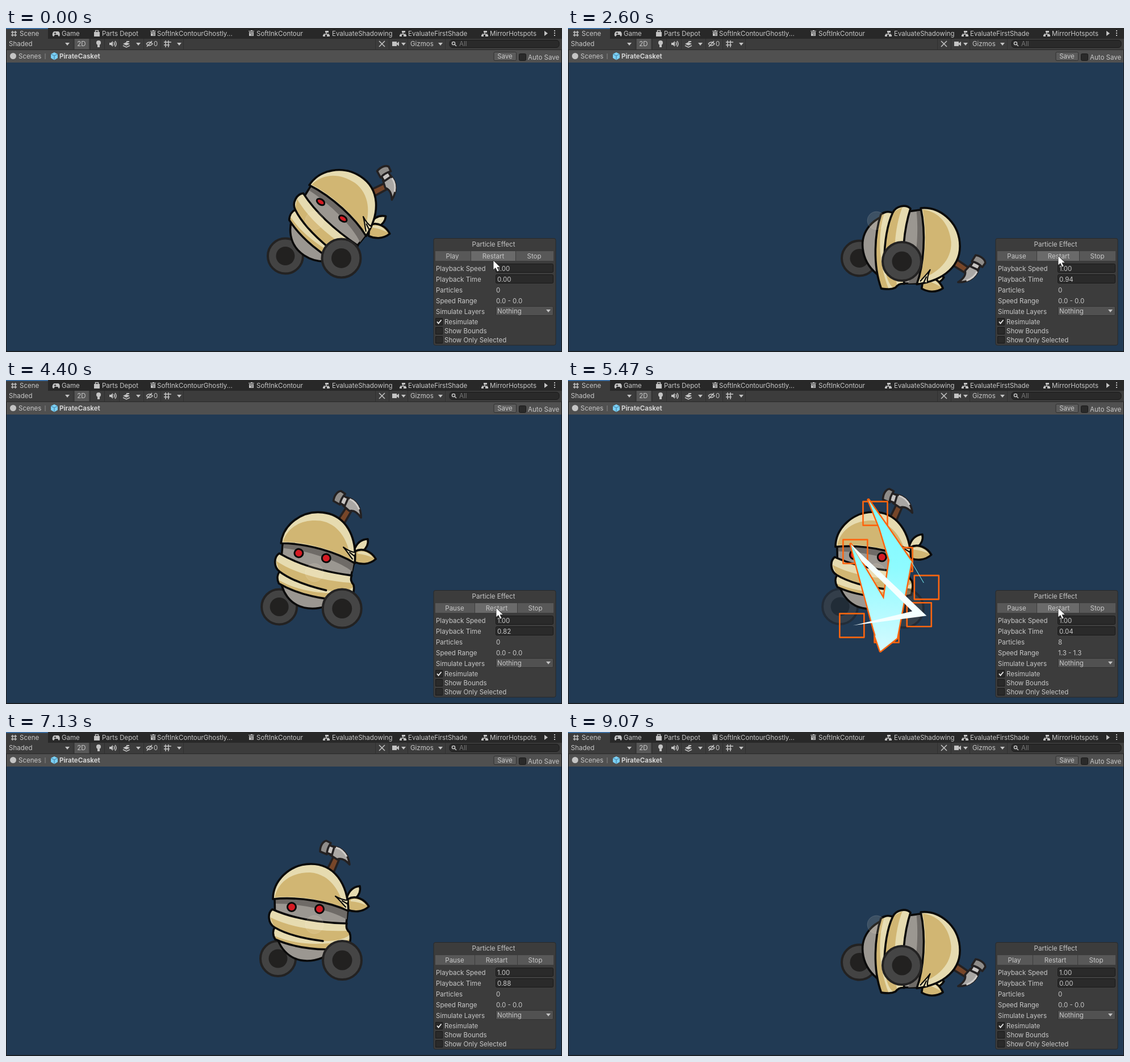
Animation of 979x572 px, one loop 9.27 s. Source, as an HTML page:

```html
<!DOCTYPE html>
<html lang="en">
<head>
<meta charset="utf-8">
<title>Particle preview</title>
<style>
html, body { margin: 0; width: 100%; height: 100%; overflow: hidden; background: #191919; }
svg { display: block; width: 979px; height: 572px; }
text { font: 11.5px Inter, "Open Sans", sans-serif; fill: #c8c8c8; white-space: pre; }
.mid { text-anchor: middle; }
.bold { font-weight: 700; fill: #d2d2d2; }
.ink { stroke: #0a0a0a; stroke-width: 3.6; stroke-linejoin: round; stroke-linecap: round; }
.icon { fill: none; stroke: #c4c4c4; stroke-width: 1.5; }
.solid { fill: #c4c4c4; }
.field { fill: #2a2a2a; stroke: #191919; }
.button { fill: #585858; }
.cream { fill: #e6dbb0; }
.tan { fill: #d1b673; }
</style>
</head>
<body>
<svg viewBox="0 0 979 572">
  <defs>
    <g id="tree" class="icon"><path d="M0-3.5V1M-4 4V1H4V4"/><path class="solid" stroke="none" d="M-2-5H4V-2H-2ZM-6 2H-2V5H-6ZM1 2H6V5H1Z"/></g>
    <g id="shader"><path class="solid" d="M-4-2H4V5H-4ZM-5-4H-1V-5H2V-4H5V-3H-5Z"/><path d="M-3 0H3M-1 3H3" stroke="#282828"/></g>
    <path id="down" class="solid" d="M-4-2H4L0 3Z"/>
    <linearGradient id="beam" x2="0" y2="1"><stop stop-color="#7dfaff"/><stop offset=".45" stop-color="#8efbff"/><stop offset="1" stop-color="#d5faff"/></linearGradient>
  </defs>

  <rect width="979" height="572" fill="#191919"/>
  <rect x="1" y="61" width="977" height="509.5" fill="#213a54"/>

  <g id="tabs">
    <rect width="979" height="19" fill="#282828"/>
    <path d="M0 0H74V19H0Z" fill="#3c3c3c"/><path d="M0 0H74V1.6H0Z" fill="#3a79bb"/>
    <path class="icon" d="M11.5 5V15M16.5 5V15M9 7.5H19M9 12.5H19"/>
    <path class="solid" d="M85 6H92C95 6 96 15 93 15L91 12H86L84 15C80 15 82 6 85 6Z"/>
    <path d="M84.500 9.500H88.500M86.500 7.500V11.500" stroke="#282828"/>
    <path class="solid" d="M155 7H165V15H155Z"/><path class="icon" d="M157.500 7V4.500H162.500V7"/>
    <use href="#shader" x="259" y="9"/><use href="#shader" x="432" y="9"/>
    <use href="#tree" x="564" y="10"/><use href="#tree" x="699" y="10"/><use href="#tree" x="843" y="10"/>
    <path class="solid" d="M948 5L954 9.500L948 14ZM965 4H967V6H965ZM965 8H967V10H965ZM965 12H967V14H965Z"/>
    <text x="24" y="14">Scene</text><text x="98" y="14">Game</text>
    <text x="169" y="14">Parts Depot</text>
    <text x="266" y="14">SoftInkContourGhostly...</text>
    <text x="441" y="14">SoftInkContour</text>
    <text x="574" y="14">EvaluateShadowing</text>
    <text x="708" y="14">EvaluateFirstShade</text>
    <text x="852" y="14">MirrorHotspots</text>
  </g>

  <g id="toolbar">
    <rect y="19" width="979" height="19.500" fill="#3c3c3c"/>
    <text x="5" y="32">Shaded</text>
    <rect x="121" y="19" width="25" height="18.500" fill="#585858"/><text class="mid" x="133" y="32">2D</text>
    <circle class="solid" cx="163" cy="26" r="4"/><path class="solid" d="M161 29H165V34H161Z"/>
    <path class="solid" d="M182 26H185L188 23V33L185 30H182Z"/><path class="icon" d="M190 25Q192 28 190 31M192 23Q196 28 192 33"/>
    <path class="solid" d="M206 28L212 25L218 28L212 31ZM212 23H217V25H212Z"/><path class="icon" d="M206 31L212 34L218 31"/>
    <path class="icon" d="M247 28Q252 22 258 28Q252 34 247 28M248 33L257 23"/><text x="260" y="32">0</text>
    <path class="icon" d="M281 22V34M286 22V34M278 25H291M278 30H288"/>
    <path d="M118.500 19V38M148.500 19V38M173.500 19V38M199.500 19V38M242.500 19V38M272.500 19V38M312.500 19V38M650.500 19V38M674.500 19V38M707.500 19V38M773.500 19V38" stroke="#303030"/>
    <path class="icon" d="M657 23L667 33M667 23L657 33" stroke-width="2"/>
    <path class="solid" d="M680 24H688V32H680ZM688 27L692 24V32L688 29Z"/>
    <use href="#down" x="108" y="28"/><use href="#down" x="233" y="28"/><use href="#down" x="305" y="28"/>
    <use href="#down" x="700" y="28"/><use href="#down" x="765" y="28"/>
    <text x="712" y="32">Gizmos</text>
    <rect class="field" x="781" y="21.500" width="193" height="13" rx="5"/>
    <circle class="icon" cx="788" cy="27" r="2.600"/><path class="icon" d="M790 29L793 32"/>
    <text x="798" y="32" style="fill:#777">All</text>
  </g>

  <g id="breadcrumb">
    <rect x="1" y="39" width="977" height="22" fill="#505050"/>
    <circle class="solid" cx="12.500" cy="49.500" r="5.500"/>
    <text x="22" y="54">Scenes</text><path d="M69 45V55" stroke="#888"/>
    <path d="M85 43L91 46V53L85 56.500L79 53V46Z" fill="#7ad0f5"/><path d="M79 46L85 49L91 46M85 49V56" fill="none" stroke="#42799b"/>
    <text class="bold" x="94" y="54">PirateCasket</text>
    <rect x="859" y="42.500" width="39.500" height="15" rx="2" fill="#5b5b5b" stroke="#303030"/><text class="mid" x="878.500" y="54">Save</text>
    <rect class="field" x="903.500" y="45.500" width="12" height="12" rx="2"/><text x="919" y="56">Auto Save</text>
  </g>

  <g id="backWheel"><circle r="31" fill="#434343" stroke="#232222" stroke-width="4"/><circle r="16.500" fill="#222120"/></g>
  <g id="body">
    <g id="hammer">
      <g class="ink" style="stroke:#242122">
        <path d="M566 242L577 219L587 224L577 248Z" fill="#774629"/>
        <path d="M576 202C592 204 603 216 605 234C597 225 590 222 583 225L571 217Z" fill="#aaa7a4"/>
        <path d="M567 199L578 203L574 217L564 213Z" fill="#c7c4c2"/>
        <path d="M553 211C553 201 558 193 564 192L572 196C567 203 565 209 565 216Z" fill="#8f8c89"/>
      </g>
      <path d="M581 204Q593 207 600 220" fill="none" stroke="#d0cdca" stroke-width="3"/>
    </g>
    <path class="ink" fill="#9b9791" d="M473 292L474 340C475 381 500 404 530 404C568 404 596 372 599 340L602 312Z"/>
    <path d="M475 293Q540 290 601 315L600 331C575 315 520 303 475 303Z" fill="#6f6b67"/>
    <g id="eyes" class="ink" fill="#d51b23" style="stroke-width:3"><ellipse cx="503" cy="309" rx="7.500"/><ellipse cx="552" cy="312.500" rx="7.500"/></g>
    <path class="cream" d="M469 313C505 329 550 337 600 338C598 346 601 350 605 354C608 362 606 370 604 379C560 390 505 380 474 366C469 358 470 350 473 345C461 338 460 320 469 313Z"/>
    <path class="tan" d="M465 327C500 345 550 353 600 351L606 356C600 367 570 371 550 368C520 364 490 352 472 344ZM473 360C505 374 555 380 606 366L604 378C560 389 505 380 474 366Z"/>
    <path class="ink" fill="none" d="M469 313C505 329 550 337 600 338C598 346 601 350 605 354C608 362 606 370 604 379C560 390 505 380 474 366C469 358 470 350 473 345C461 338 460 320 469 313ZM473 345C495 358 525 365 558 369"/>
    <path id="upperTail" class="ink cream" d="M600 293C604 279 612 273 623 272C625 281 621 289 615 294L604 305Z"/>
    <g id="lowerTail">
      <path class="ink tan" d="M602 295C616 287 632 296 639 308C627 319 612 318 602 314Z"/>
      <path class="cream" d="M607 296Q622 291 634 306Q622 300 607 299Z"/>
    </g>
    <path class="cream" d="M470 295C470 262 500 233 537 233C578 233 602 268 603 316C570 300 515 290 470 295Z"/>
    <path class="tan" d="M473 292C480 262 505 248 535 248C568 250 588 278 595 311C565 297 515 288 473 292Z"/>
    <path class="ink" fill="none" d="M470 295C470 262 500 233 537 233C578 233 602 268 603 316C570 300 515 290 470 295Z"/>
    <path class="ink cream" style="stroke-width:2.2" d="M602 297C594 297 587 294 580 290C587 296 592 303 598 309M592 298L602 304"/>
  </g>
  <g id="frontWheel"><circle r="34" fill="#454545" stroke="#232222" stroke-width="4"/><circle r="17.500" fill="#222120"/></g>
  <circle cx="543" cy="340" r="16" fill="#fff2cf" fill-opacity=".13" stroke="#fff" stroke-opacity=".12"/>

  <g id="burst">
    <path id="boxes" fill="none" stroke="#ff650f" stroke-width="2.600" stroke-linejoin="round"/>
    <path id="glow" fill="#ff650f" stroke="#ff650f" stroke-width="5" stroke-linejoin="round"/>
    <path id="blades" fill="url(#beam)"/>
    <path id="slash" fill="#f4ffff"/>
    <path id="spark" fill="none" stroke="#7dfaff"/>
  </g>

  <g id="panel">
    <rect x="753" y="371.500" width="215" height="188.500" rx="3" fill="#3c3c3c" stroke="#292929"/>
    <text class="mid" x="858.500" y="386">Particle Effect</text>
    <rect id="b0" class="button" y="394" height="17"/><rect id="b1" y="394" height="17"/><rect id="b2" class="button" y="394" height="17"/>
    <text id="l0" class="mid" y="407"></text><text id="l1" class="mid" y="407">Restart</text><text id="l2" class="mid" y="407">Stop</text>
    <rect class="field" x="862.500" y="416.500" width="101" height="15" rx="2"/><rect class="field" x="862.500" y="435.500" width="101" height="15" rx="2"/>
    <text x="757" y="429">Playback Speed</text><text x="865" y="429">1.00</text>
    <text x="757" y="448">Playback Time</text><text id="clock" x="865" y="448"></text>
    <text x="757" y="467">Particles</text><text id="count" x="863" y="467"></text>
    <text x="757" y="485.500">Speed Range</text><text id="range" x="863" y="485.500"></text>
    <text x="757" y="505">Simulate Layers</text>
    <rect x="862.500" y="491.500" width="101" height="16" rx="2" fill="#515151" stroke="#303030"/><text x="865" y="504">Nothing</text><use href="#down" x="955" y="499"/>
    <path class="field" d="M756.500 512.500H768.500V524.500H756.500ZM756.500 528.500H768.500V540.500H756.500ZM756.500 544.500H768.500V556.500H756.500Z"/>
    <path class="icon" d="M759 518.500L761.500 521.500L766.500 515.500" style="stroke:#eee;stroke-width:1.8"/>
    <text x="772" y="523">Resimulate</text><text x="772" y="539">Show Bounds</text><text x="772" y="555">Show Only Selected</text>
  </g>
  <path id="pointer" d="M0 0V17L4 13.500L7 20L10 18.500L7 12.500H12.500Z" fill="#fff" stroke="#222" stroke-width=".8"/>
</svg>
<script>
const LOOP = 9270;
const el = Object.fromEntries([...document.querySelectorAll('[id]')].map(e => [e.id, e]));

// Each row: time, then the values reached at that time.
function sample(rows, time) {
  const next = rows.findIndex(row => row[0] > time);
  if (next === 0) return rows[0].slice(1);
  if (next < 0) return rows.at(-1).slice(1);
  const a = rows[next - 1], b = rows[next];
  const mix = (time - a[0]) / (b[0] - a[0]);
  return a.slice(1).map((v, i) => v + (b[i + 1] - v) * mix);
}

// time, angle, centre x, centre y, wheel spread, eye opening
const FALL = [
  [0, 0, 535, 318, 0, 1],
  [15, 6, 546, 318, .06, .98],
  [120, 33, 576, 332, .38, .62],
  [270, 70, 604, 366, .8, .15],
  [335, 84, 605, 385, 1, 0]
];
const FALL_START = 4385, FALL_PERIOD = 1085, FALL_RESET = 500, RESUME = 1250;

const POINTER = [
  [0, 858, 410], [150, 856, 428], [430, 816, 405], [580, 826, 365],
  [730, 842, 392], [870, 842, 397], [1400, 842, 397], [1620, 863, 402]
];
const POINTER_GONE = 6700;

const RESTARTS = [1660, 2640, 3580, 4510, 5430, 6250];
const TURNS = [200, 95, -60, 150, 0, 250];
const STOPPED = 7290, LIFE = .36;

const BLADES = [
  [[529, 212], [560, 256], [604, 320], [579, 455], [550, 478], [541, 452], [556, 387], [566, 318], [549, 262]],
  [[498, 290], [556, 387], [579, 455], [550, 478], [538, 438]]
];
const SLASH = [[498, 290], [631, 416], [502, 433], [606, 408], [517, 320]];
const SPARK = [[604, 320], [626, 358]];
const PARTICLES = [[541, 236], [506, 303], [631, 366], [618, 414], [500, 433], [585, 317], [561, 442]];

function drawBody(t) {
  let phase = (Math.max(t, RESUME) - FALL_START) % FALL_PERIOD;
  if (phase < 0) phase += FALL_PERIOD;
  if (phase > FALL_RESET) phase = 0;
  const [angle, x, y, spread, open] = sample(FALL, phase);
  el.body.setAttribute('transform', `translate(${x} ${y}) rotate(${angle}) translate(-535 -318)`);
  // The hammer swings ahead of the body while the loose cloth hangs back.
  el.hammer.setAttribute('transform', `rotate(${angle * .18} 571 246)`);
  el.upperTail.setAttribute('transform', `rotate(${angle * -.5} 603 305)`);
  el.lowerTail.setAttribute('transform', `rotate(${angle * -.9} 603 305)`);
  el.backWheel.setAttribute('transform', `translate(${479 + 34 * spread} ${400 + 6.5 * spread})`);
  el.frontWheel.setAttribute('transform', `translate(${592 - 4 * spread} ${403 + 9 * spread})`);
  for (const eye of el.eyes.children) eye.setAttribute('ry', 7.5 * open);
  el.eyes.style.display = open > .02 ? '' : 'none';
}

function drawBurst(age, turn) {
  const alive = age >= 0 && age < LIFE;
  el.burst.style.display = alive ? '' : 'none';
  const dim = alive && age < .08 ? .55 : 1;
  el.backWheel.style.opacity = el.frontWheel.style.opacity = dim;
  if (!alive) return;
  const grow = age < .04 ? .5 + age * 12.5 : 1 + .5 * (1 - Math.exp((.04 - age) * 8));
  const a = turn * Math.PI / 180, cos = Math.cos(a) * grow, sin = Math.sin(a) * grow;
  const place = ([x, y]) => [543 + (x - 543) * cos - (y - 340) * sin, 340 + (x - 543) * sin + (y - 340) * cos];
  const outline = points => 'M' + points.map(place).join('L');
  const blades = BLADES.map(p => outline(p) + 'Z').join('');
  el.blades.setAttribute('d', blades);
  el.glow.setAttribute('d', blades);
  el.slash.setAttribute('d', outline(SLASH) + 'Z');
  el.spark.setAttribute('d', outline(SPARK));
  el.boxes.setAttribute('d', PARTICLES.map(p => {
    const [x, y] = place(p);
    return `M${x - 21.5} ${y - 21}h43v42h-43Z`;
  }).join(''));
  el.burst.style.opacity = Math.min(1, (LIFE - age) / .18);
}

function drawPanel(t, age) {
  const playing = age >= 0;
  const alive = playing && age < LIFE;
  const edges = playing ? [756, 826, 901, 965] : [756, 819, 898, 965];
  const centres = playing ? [790, 864, 932] : [786, 858, 930];
  centres.forEach((x, i) => {
    el['b' + i].setAttribute('x', edges[i]);
    el['b' + i].setAttribute('width', edges[i + 1] - edges[i] - 1);
    el['l' + i].setAttribute('x', x);
  });
  el.l0.textContent = playing ? 'Pause' : 'Play';
  el.clock.textContent = Math.max(0, age).toFixed(2);
  el.count.textContent = alive ? '8' : '0';
  el.range.textContent = alive ? '1.3 - 1.3' : '0.0 - 0.0';

  const [x, y] = sample(POINTER, t);
  const present = t < POINTER_GONE;
  const hover = present && x > edges[1] && x < edges[2] && y > 393 && y < 412;
  el.b1.setAttribute('fill', hover ? '#6a6a6a' : '#585858');
  el.pointer.style.display = present ? '' : 'none';
  el.pointer.setAttribute('transform', `translate(${x} ${y})`);
}

function draw(t) {
  const run = t < STOPPED ? RESTARTS.findLastIndex(start => start <= t) : -1;
  const age = run < 0 ? -1 : (t - RESTARTS[run]) / 1000;
  drawBody(t);
  drawBurst(age, TURNS[run]);
  drawPanel(t, age);
}

const begin = performance.now();
function tick() {
  draw((performance.now() - begin) % LOOP);
  requestAnimationFrame(tick);
}
draw(0);
requestAnimationFrame(tick);
</script>
</body>
</html>
```
